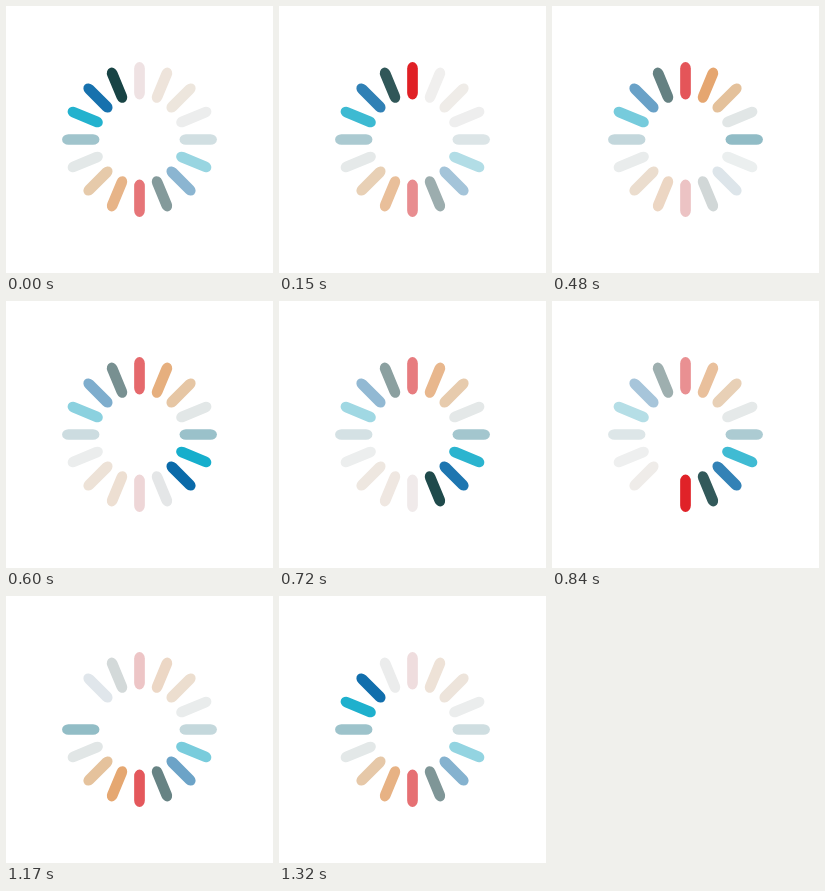
These frames come from a looping animation (267x267 px, 1.35 s). An HTML page with a canvas:

```html
<!DOCTYPE html>
<html lang="en">
<head>
<meta charset="utf-8">
<title>Spinner</title>
<style>
html, body { margin: 0; width: 100%; height: 100%; overflow: hidden; background: #fff; }
canvas { display: block; width: 100vw; height: 100vh; }
</style>
</head>
<body>
<canvas></canvas>
<script>
const STAGE = 267, LOOP = 1350, STEP = 30, BARS = 16;
const FADED = 240;      // grey level a bar fades towards
const HIDDEN = 0.01;    // below this strength a bar disappears
const COLORS = [
  [223, 21, 27], [226, 144, 73], [226, 184, 138], [223, 229, 229],
  [141, 186, 196], [6, 169, 201], [8, 105, 169], [24, 68, 69]
];

const canvas = document.querySelector('canvas');
const ctx = canvas.getContext('2d');

const bar = new Path2D();
bar.roundRect(-2, -29, 4, 14, { x: 2, y: 2.4 });

function resize() {
  const ratio = window.devicePixelRatio || 1;
  canvas.width = Math.round(innerWidth * ratio);
  canvas.height = Math.round(innerHeight * ratio);
}

// Each bar lights up in turn, then fades linearly over one loop.
function strength(index, time) {
  const start = (index + 1) * LOOP / BARS;
  const age = (time - start + LOOP) % LOOP;
  return 1 - age / LOOP;
}

function mix(color, amount) {
  const channels = color.map(c => Math.round(FADED + (c - FADED) * amount));
  return `rgb(${channels.join(',')})`;
}

function draw(time) {
  const w = canvas.width, h = canvas.height;
  const unit = Math.min(w, h) / 100;
  ctx.setTransform(1, 0, 0, 1, 0, 0);
  ctx.fillStyle = '#fff';
  ctx.fillRect(0, 0, w, h);
  ctx.setTransform(unit, 0, 0, unit, w / 2, h / 2);
  for (let i = 0; i < BARS; i++) {
    const amount = strength(i, time);
    if (amount > HIDDEN) {
      ctx.fillStyle = mix(COLORS[i % COLORS.length], amount);
      ctx.fill(bar);
    }
    ctx.rotate(2 * Math.PI / BARS);
  }
}

let origin = null;
function tick() {
  const now = performance.now();
  if (origin === null) origin = now;
  draw(Math.floor((now - origin) % LOOP / STEP) * STEP);
  requestAnimationFrame(tick);
}

addEventListener('resize', resize);
resize();
tick();
</script>
</body>
</html>
```
